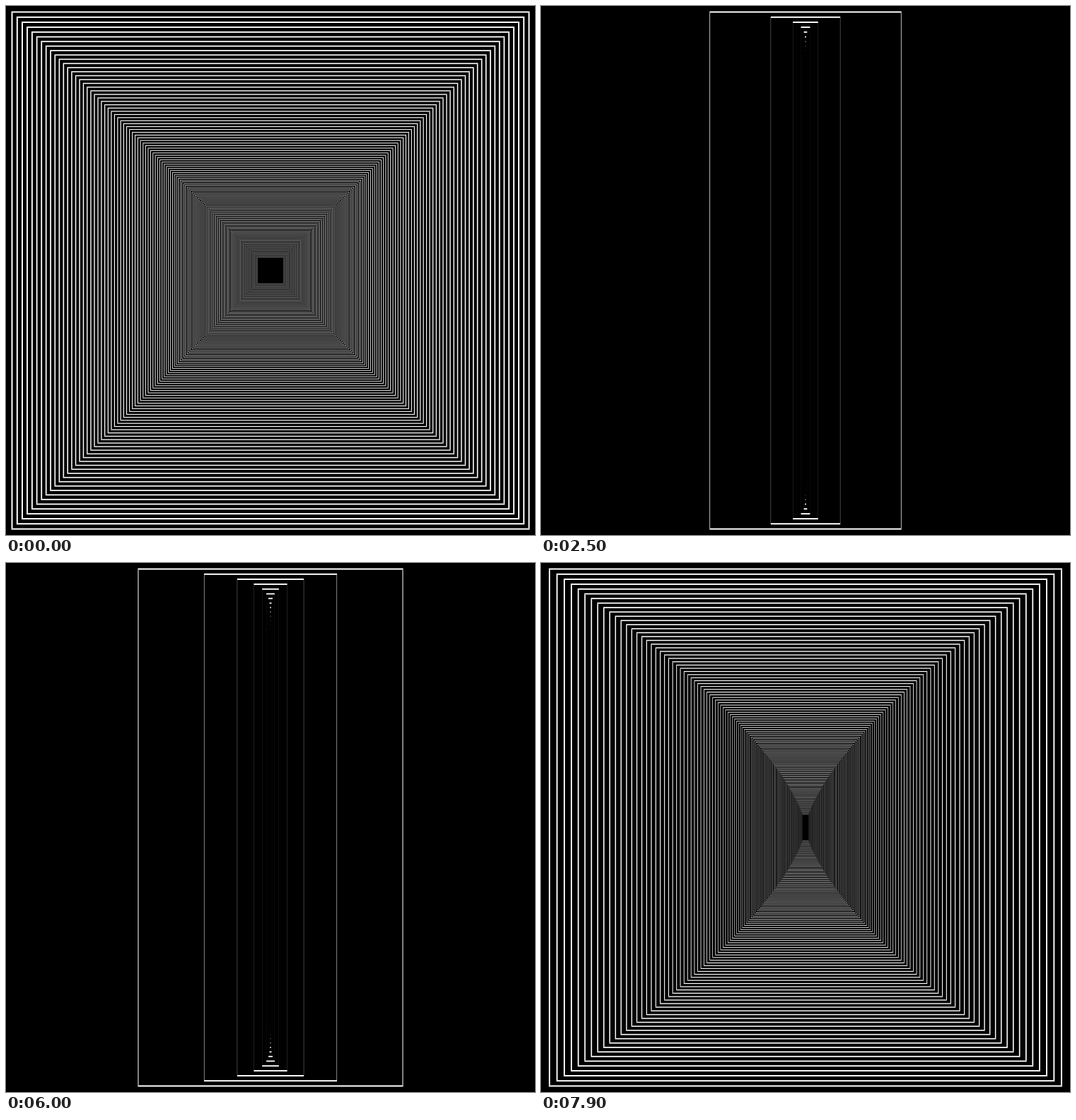
An HTML page with a canvas that plays this animation: 748x748 px, repeating every 8000 ms.

```html
<!DOCTYPE html>
<html lang="en">
<head>
<meta charset="utf-8">
<title>Nested squares</title>
<style>
  html, body { margin: 0; width: 100%; height: 100%; overflow: hidden; background: #000; }
  canvas { display: block; width: 748px; height: 748px; }
</style>
</head>
<body>
<canvas id="stage" width="748" height="748"></canvas>
<script>
const ctx = document.getElementById('stage').getContext('2d');
const SIZE = 748, MID = SIZE / 2;
const HALF = 366.5, LINE = 2; // outer half side and border of the largest square
const COUNT = 150, SHRINK = 0.98;
const LOOP = 8000, STEP = 100;
const FOLD = 3969; // time at which the squares are squeezed flat
const THIN = 0.01; // half width below which a square cannot be seen

// Border of a square scaled by sx, sy; filled bars keep hairline sides faint.
function frame(sx, sy) {
  const w = HALF * sx, h = HALF * sy;
  const side = LINE * sx, bar = LINE * sy;
  const inner = 2 * (h - bar);
  ctx.fillRect(MID - w, MID - h, 2 * w, bar);
  ctx.fillRect(MID - w, MID + h - bar, 2 * w, bar);
  ctx.fillRect(MID - w, MID - h + bar, side, inner);
  ctx.fillRect(MID + w - side, MID - h + bar, side, inner);
}

// Each square squeezes the next one, so the narrowing compounds inwards.
function draw(time) {
  const squeeze = Math.abs(1 - time / FOLD);
  ctx.fillStyle = '#000';
  ctx.fillRect(0, 0, SIZE, SIZE);
  ctx.fillStyle = '#fff';

  let sx = squeeze, sy = 1;
  for (let i = 0; i < COUNT && sx * HALF > THIN; i++) {
    frame(sx, sy);
    sx *= SHRINK * squeeze;
    sy *= SHRINK;
  }
}

const start = performance.now();
function tick() {
  const time = (performance.now() - start) % LOOP;
  draw(Math.floor(time / STEP) * STEP);
  requestAnimationFrame(tick);
}
tick();
</script>
</body>
</html>
```
